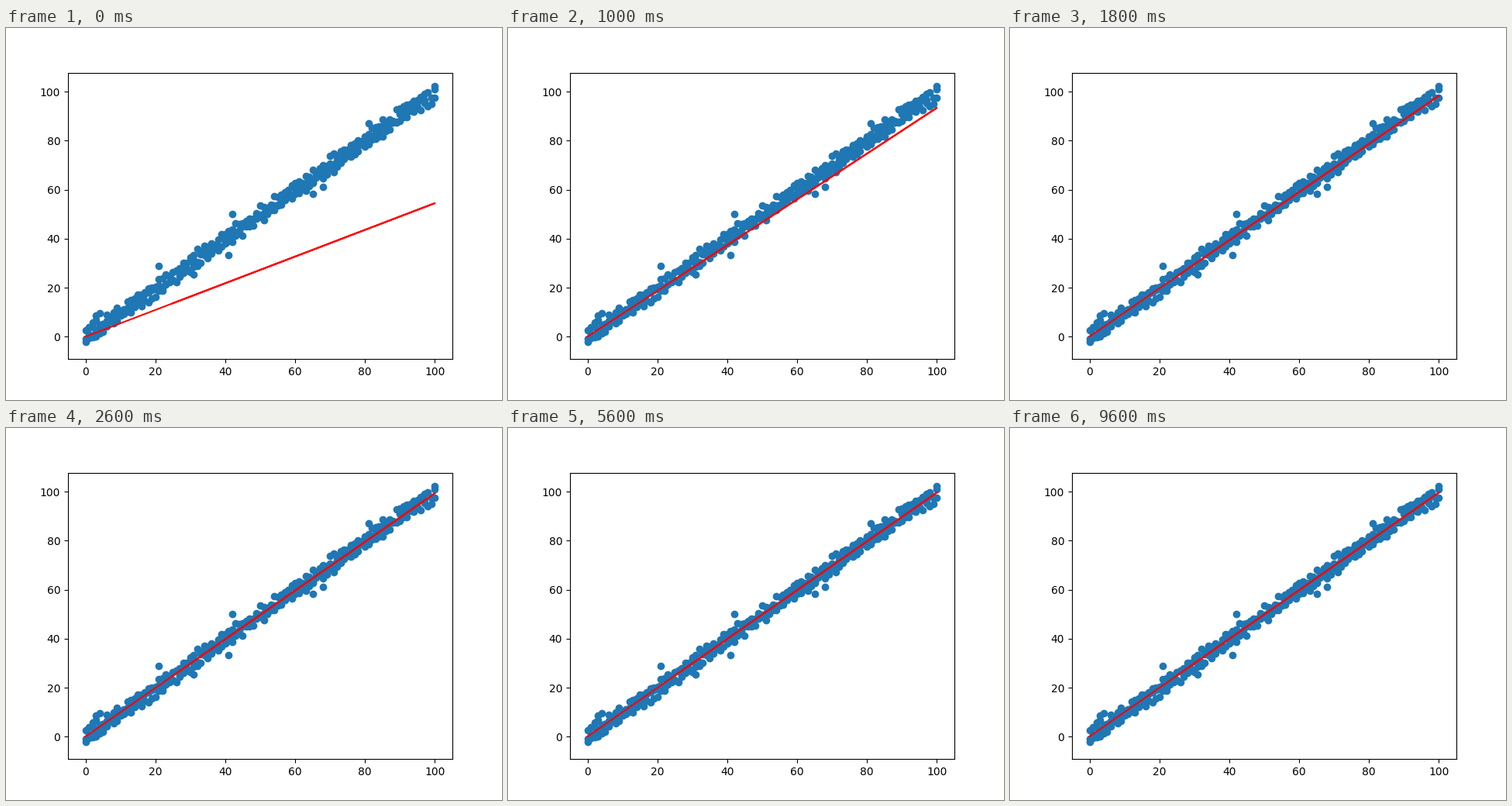
Recreate the animation shown at these times as a matplotlib script. Size 640x480 px, loop 10 s.

```python
import numpy as np
import matplotlib.pyplot as plt
from matplotlib.animation import FuncAnimation

FRAMES, INTERVAL = 50, 200

# The few points that stand clear of the cloud.
OUTLIERS = [(3, 8.5), (4, 9.6), (21, 29), (31, 25.4), (41, 33.3),
            (42, 50), (65, 58.3), (68, 61), (81, 87), (100, 102.4)]


def make_data(seed=7):
    """Three noisy points per x: below, on and above the diagonal."""
    rng = np.random.default_rng(seed)
    x = np.tile(np.arange(101), 3)
    offset = np.repeat([-2, 0, 2], 101)
    y = x + offset + np.clip(rng.normal(0, 1.1, x.size), -1.9, 1.9)
    inside = y < 101.5
    points = np.vstack([np.column_stack([x, y])[inside], OUTLIERS])
    return rng.permutation(points).T


def fitted_line(step):
    """Slope converges geometrically; the intercept creeps upward."""
    drift = 0.0006 * step
    slope = 0.997 - 0.452 * 0.6735 ** step - 0.015 * drift
    return slope, 0.008 + drift


x, y = make_data()
fig, ax = plt.subplots(figsize=(6.4, 4.8), dpi=100)
ax.scatter(x, y)
line, = ax.plot([], [], color="red")
ax.set_xlim(-5, 105)
ax.set_ylim(-9.16, 107.8)


def update(step):
    slope, intercept = fitted_line(step)
    line.set_data(x, slope * x + intercept)
    return line,


anim = FuncAnimation(fig, update, frames=FRAMES, interval=INTERVAL,
                     repeat=True, repeat_delay=0)
plt.show()
```
